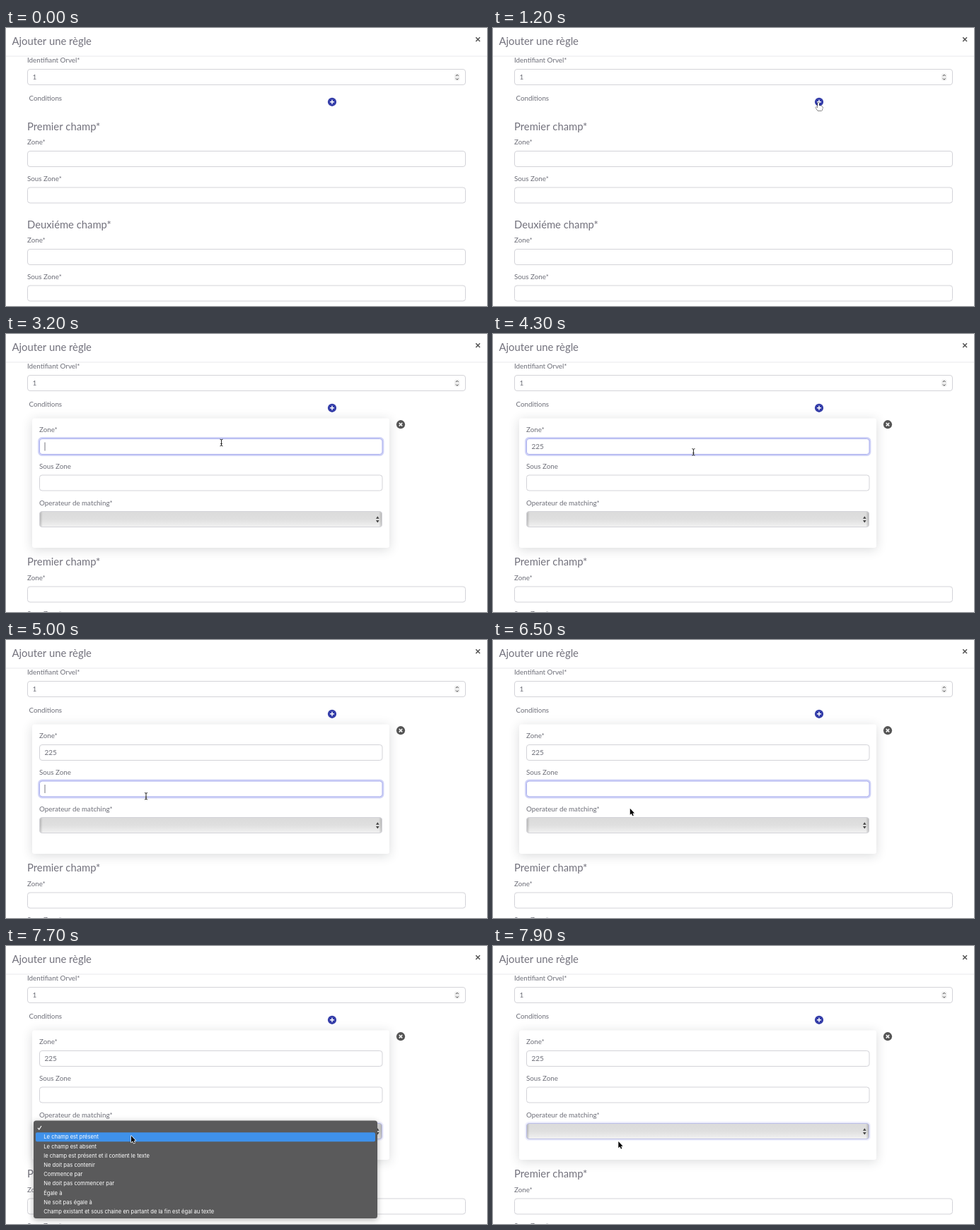
An HTML page with a canvas that plays this animation: 680 by 394 pixels, repeating every 8000 ms.

```html
<!DOCTYPE html>
<html lang="fr">
<head>
<meta charset="utf-8">
<title>Ajouter une règle</title>
<style>
  html, body { margin: 0; width: 100%; height: 100%; overflow: hidden; background: #fff; }
  canvas { display: block; width: 680px; height: 394px; }
</style>
</head>
<body>
<canvas id="stage" width="680" height="394"></canvas>
<script>
const c = document.getElementById('stage').getContext('2d');
const LOOP = 8000, STEP = 100, SHIFT = 183.5;
const LABEL = '#6d6e78', HEAD = '#73727d';
const ITEMS = ['', 'Le champ est présent', 'Le champ est absent',
  'le champ est présent et il contient le texte', 'Ne doit pas contenir',
  'Commence par', 'Ne doit pas commencer par', 'Égale à', 'Ne soit pas égale à',
  'Champ existant et sous chaine en partant de la fin est égal au texte'];

const ramp = (t, a, b) => Math.min(1, Math.max(0, (t - a) / (b - a)));
const ease = p => p * p * (3 - 2 * p);
const mix = (a, b, p) => a + (b - a) * p;

function text(s, x, y, size = 9.8, color = LABEL, font = 'Lato, "Open Sans", sans-serif') {
  c.font = `${size}px ${font}`;
  c.fillStyle = color;
  c.fillText(s, x, y);
}

function box(x, y, w, h, r) {
  c.beginPath();
  c.roundRect(x, y, w, h, r);
}

function lines(color, width, ...paths) {
  c.strokeStyle = color;
  c.lineWidth = width;
  c.beginPath();
  for (const p of paths)
    for (let i = 0; i < p.length; i += 2) c[i ? 'lineTo' : 'moveTo'](p[i], p[i + 1]);
  c.stroke();
}

function tri(x, y, w, h, color) {
  c.fillStyle = color;
  c.beginPath();
  c.moveTo(x - w, y);
  c.lineTo(x + w, y);
  c.lineTo(x, y + h);
  c.fill();
}

function ring(x, y, w, h, focus) {
  if (focus) {
    box(x - 1.2, y - 1.2, w + 2.4, h + 2.4, 4.5);
    c.strokeStyle = `rgba(84,92,224,${0.27 * focus * focus})`;
    c.lineWidth = 2.4;
    c.stroke();
  }
  box(x, y, w, h, 3.5);
  c.strokeStyle = `rgb(${mix(211, 168, focus)},${mix(211, 173, focus)},${mix(216, 238, focus)})`;
  c.lineWidth = 1;
  c.stroke();
}

function field(x, y, w, focus = 0) {
  box(x, y, w, 22, 3.5);
  c.fillStyle = '#fff';
  c.fill();
  ring(x, y, w, 22, focus);
}

function disc(x, y, color, ...strokes) {
  c.fillStyle = color;
  c.beginPath();
  c.arc(x, y, 6.1, 0, 7);
  c.fill();
  lines('#fff', 1.5, ...strokes);
}

function section(title, y) {
  text(title, 30, y + 5, 14.8, HEAD);
  text('Zone*', 30, y + 25.7);
  field(30.5, y + 35, 619);
  text('Sous Zone*', 30, y + 77.4);
  field(30.5, y + 86.5, 619);
}

function page(open) {
  const dy = open ? SHIFT : 0;
  text('Identifiant Orvel*', 30, 49.3);
  field(30.5, 58.5, 619);
  text('1', 37.5, 73, 10);
  box(634, 64.5, 7.5, 10, 2.5);
  c.fillStyle = '#ededed';
  c.fill();
  lines('#444', 1, [636, 68, 637.8, 66.2, 639.6, 68], [636, 71.5, 637.8, 73.3, 639.6, 71.5]);
  text('Conditions', 32.5, 103.3);
  disc(461, 104.8, '#343da9', [458, 104.8, 464, 104.8], [461, 101.8, 461, 107.8]);
  section('Premier champ*', 139.5 + dy);
  section('Deuxiéme champ*', 278.5 + dy);
  text('Ajouter une règle', 8.5, 24.3, 14.8, HEAD);
  lines('#e9e9ec', 1, [0, 40, 680, 40]);
  lines('#555', 1.6, [664.3, 13.3, 670, 19], [670, 13.3, 664.3, 19]);
}

function select(focus) {
  const x = 47.5, y = 251.5, w = 484, h = 22;
  let g = c.createLinearGradient(0, y, 0, y + h);
  g.addColorStop(0, '#dbdbdb');
  g.addColorStop(0.5, '#dfdfdf');
  g.addColorStop(1, '#f2f2f2');
  box(x, y, w, h, 3.5);
  c.fillStyle = g;
  c.fill();
  g = c.createLinearGradient(x, 0, x + w, 0);
  g.addColorStop(0, 'rgba(0,0,0,.2)');
  g.addColorStop(0.009, 'rgba(0,0,0,0)');
  g.addColorStop(0.991, 'rgba(0,0,0,0)');
  g.addColorStop(1, 'rgba(0,0,0,.2)');
  c.fillStyle = g;
  c.fill();
  ring(x, y, w, h, focus * 0.6);
  tri(525.3, 261.7, 2.3, -3.5, '#444');
  tri(525.3, 264, 2.3, 3.5, '#444');
}

function panel(t) {
  const focus1 = ramp(t, 2200, 2400) - ramp(t, 4800, 5000);
  const focus2 = ramp(t, 4800, 5000) - ramp(t, 6700, 6900);
  c.save();
  c.globalAlpha = t < 1400 ? 0.6 : 1;
  c.save();
  c.shadowColor = 'rgba(34,41,47,.17)';
  c.shadowBlur = 15;
  c.shadowOffsetY = 2.5;
  box(37, 119.5, 505, 183.5, 3);
  c.fillStyle = '#fff';
  c.fill();
  c.restore();
  disc(558, 128.2, '#555', [555.8, 126, 560.2, 130.4], [560.2, 126, 555.8, 130.4]);
  text('Zone*', 47, 139.2);
  field(47.5, 148.5, 484.5, focus1);
  text('Sous Zone', 47, 191);
  field(47.5, 200, 484.5, focus2);
  text('Operateur de matching*', 47, 242.6);
  select(ramp(t, 6700, 6900));

  const typed = (t >= 3300) + (t >= 3500) + (t >= 3700);
  text('225'.slice(0, typed), 54.5, 163.2, 10);
  const caret = (x, y) => lines('#77777f', 1, [x, y, x, y + 12]);
  if ((t >= 2200 && t < 2700) || (t >= 3200 && t < 4200)) caret(55 + 5.8 * typed, 153.5);
  if ((t >= 4900 && t < 5400) || (t >= 5800 && t < 6400)) caret(55, 205);
  c.restore();
}

function menu(row, alpha) {
  c.save();
  c.globalAlpha = alpha;
  c.save();
  c.shadowColor = 'rgba(0,0,0,.3)';
  c.shadowBlur = 8;
  c.shadowOffsetY = 2;
  box(39, 247.5, 486, 138.5, 3.5);
  c.fillStyle = '#5a5a5b';
  c.fill();
  c.restore();
  box(42, 251 + row * 13.2, 480, 13, 2);
  c.fillStyle = '#3f91ea';
  c.fill();
  ITEMS.forEach((s, i) => text(s, 53.3, 260.2 + i * 13.2, 7.6, '#fff', 'Inter, sans-serif'));
  lines('#fff', 1.2, [45, 257.8, 46.8, 260, 50, 255]);
  c.restore();
}

const ARROW = new Path2D('M0 0V9.2L2.1 7.3L3.6 10.6L5 10L3.6 6.8H6.3Z');
const HAND = new Path2D('M-1 0Q0-1.4 1 0V4Q2.2 3.2 2.8 4.4Q4.3 4 4.6 5.2Q6 5 6 6.4Q6 8.6 4.8 11H-1.2Q-2.4 8.6-4 6.7Q-3.6 5.1-1 7Z');

function pointer(kind, x, y) {
  c.save();
  c.translate(x, y);
  c.lineJoin = 'round';
  if (kind === 'beam') {
    lines('#fff', 2.2, [0, -4, 0, 4]);
    lines('#222', 1, [-2, -4.8, 0, -4, 2, -4.8], [0, -4, 0, 4], [-2, 4.8, 0, 4, 2, 4.8], [-1.2, 1.5, 1.2, 1.5]);
  } else {
    const hand = kind === 'hand', shape = hand ? HAND : ARROW;
    c.strokeStyle = hand ? '#111' : '#fff';
    c.lineWidth = hand ? 1 : 1.4;
    c.fillStyle = hand ? '#fff' : '#000';
    c.stroke(shape);
    c.fill(shape);
  }
  c.restore();
}

// Pointer position and shape, or null while typing hides it
function mouse(t) {
  const go = (x0, y0, x1, y1, a, b) => {
    const p = ease(ramp(t, a, b));
    return [mix(x0, x1, p), mix(y0, y1, p)];
  };
  let x, y;
  if (t < 300 || (t >= 3300 && t < 4200)) return null;
  if (t < 1600) {
    const p = ease(ramp(t, 300, 1000)), q = 1 - p;
    x = q * q * 418 + 2 * p * q * 427 + p * p * 460;
    y = q * q * 66 + 2 * p * q * 106 + p * p * 106;
  } else if (t < 3300) [x, y] = go(460, 106, 304.5, 154, 1600, 2250);
  else if (t < 6300) [x, y] = go(304.5, 154, 198, 221.3, 4100, 4800);
  else if (t < 7000) [x, y] = go(198, 221.3, 189.5, 256, 6300, 6700);
  else if (t < 7700) [x, y] = go(189.5, 256, 177, 269, 7000, 7600);
  else [x, y] = go(177, 269, 177.3, 277, 7700, 7900);

  const inField = t > 1600 && x < 532 && ((y > 148 && y < 171) || (y > 199 && y < 223));
  const kind = Math.hypot(x - 461, y - 105) < 7 ? 'hand' : inField ? 'beam' : 'arrow';
  return { kind, x, y };
}

function draw(t) {
  c.fillStyle = '#fff';
  c.fillRect(0, 0, 680, 394);
  const open = t >= 1300, m = mouse(t);
  page(open);
  if (open) panel(t);
  if (t >= 6800 && t < 7900) menu(m.y > 263.5 ? 1 : 0, t < 7800 ? 1 : 0.5);
  if (m) pointer(m.kind, m.x, m.y);
}

function tick(now) {
  draw(Math.floor(now % LOOP / STEP) * STEP);
  requestAnimationFrame(tick);
}
requestAnimationFrame(tick);
</script>
</body>
</html>
```
